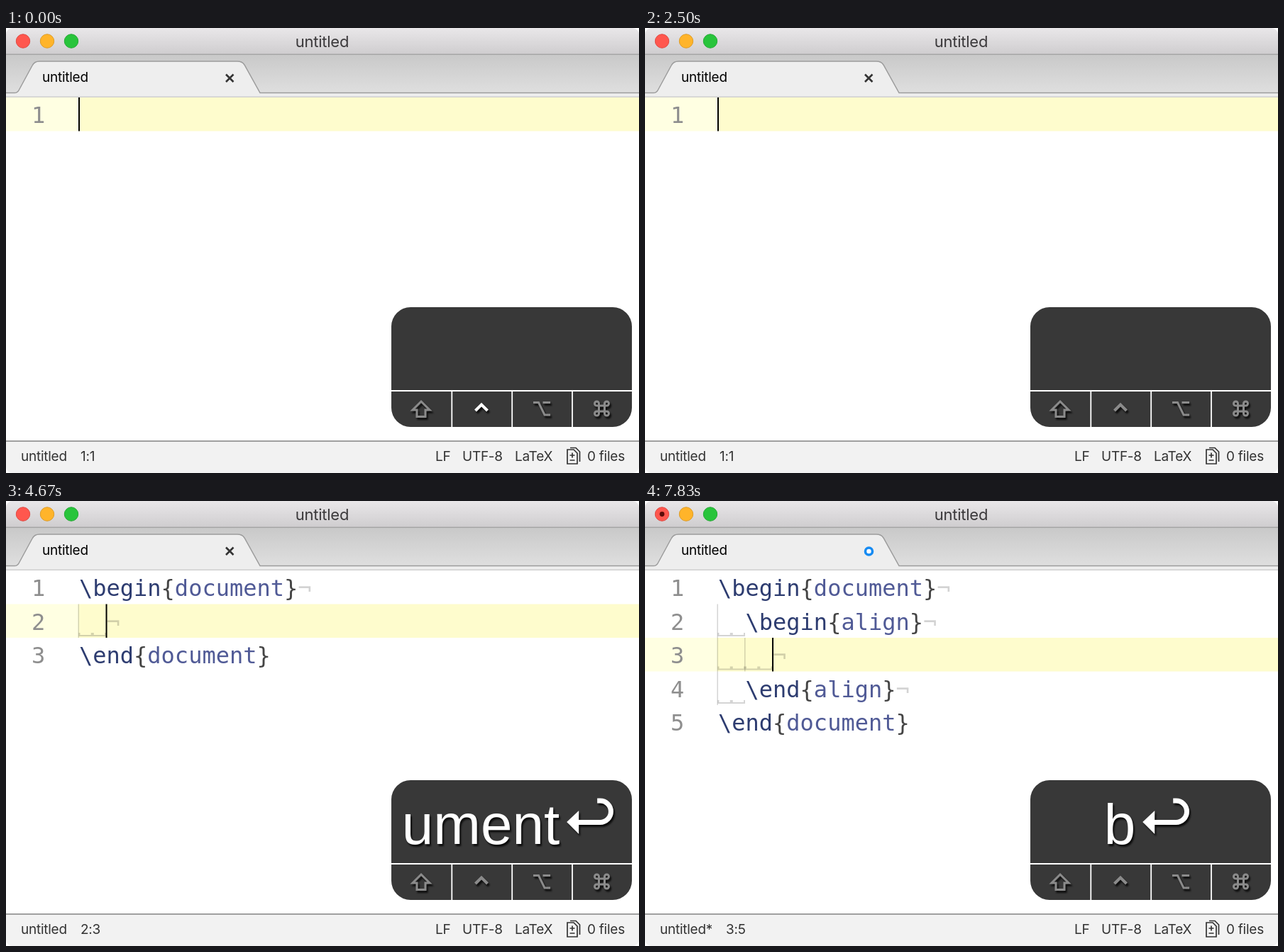
Animation, 892 px wide and 628 px high, one loop 8000 ms. Source, as an HTML page:

```html
<!DOCTYPE html>
<html lang="en">
<head>
<meta charset="utf-8">
<title>untitled</title>
<style>
  html, body { margin: 0; width: 100%; height: 100%; overflow: hidden; background: #fff; }
  svg { display: block; width: 100%; height: 100%; }
  text { font: 19px Inter, Roboto, sans-serif; letter-spacing: -.25px; fill: #333; white-space: pre; }
  .title { font-size: 22px; fill: #3b393b; }
  .mono { font: 32px "DejaVu Sans Mono", monospace; letter-spacing: 0; fill: #444; }
  .query { font-size: 24px; fill: #333; }
  .number { fill: #8e8e8e; }
  .command { fill: #2d3c70; }
  .name { fill: #505a96; }
  .mark { fill: #000; opacity: .17; }
  .space { fill: none; stroke: #000; stroke-width: 2; opacity: .17; }
  .small { font-size: 17px; letter-spacing: -.2px; }
  .keys { font: 80px "Liberation Sans", Arial, sans-serif; letter-spacing: 0; fill: #fff; }
  .lifted { filter: drop-shadow(2px 3px 1px #000c); }
  .panel { filter: drop-shadow(0 2px 6px #0006); }
</style>
</head>
<body>
<svg id="stage" viewBox="0 0 892 628" xmlns="http://www.w3.org/2000/svg"></svg>
<script>
const LOOP = 8000, STEPS = 48, STEP = LOOP / STEPS;
const LEFT = 103, CHAR = 19.27, TOP = 98, ROW = 47.5;
const ENVIRONMENTS = ['align', 'align*', 'aligned', 'alignat', 'alignat*', 'alignedat', ''];

const block = (name, body) => `\\begin{${name}}\n${body}\n\\end{${name}}`;
const nested = block('document', '  \\begin{align}\n    \n  \\end{align}');

// Each entry changes part of the state from its step on.
const timeline = [
  [0, { text: '', row: 0, palette: null, dirty: false, mod: 'control', keys: '' }],
  [2, { palette: '', keys: 'b' }],
  [3, { mod: '' }],
  [6, { keys: 'b↩' }],
  [7, { palette: null, text: block('align', '  '), row: 1 }],
  [8, { text: block('align', '   ') }],
  [9, { dirty: true }],
  [11, { mod: 'command', keys: '' }],
  [12, { text: block('align', '  '), keys: 'z' }],
  [13, { text: '', row: 0, keys: 'zz' }],
  [15, { dirty: false, mod: '', keys: '' }],
  [16, { mod: 'control' }],
  [17, { palette: '', keys: 'b' }],
  [18, { mod: '' }],
  ...[...'document'].map((_, i) => [19 + i, {
    palette: 'document'.slice(0, i + 1),
    keys: 'bdocument'.slice(0, i + 2).slice(-6)
  }]),
  [27, { palette: null, text: block('document', '  '), row: 1, keys: 'ument↩' }],
  [30, { dirty: true }],
  [33, { mod: 'control', keys: '' }],
  [34, { palette: '', keys: 'b' }],
  [35, { mod: '' }],
  [41, { palette: null, text: nested, row: 2, keys: 'b↩' }]
];

function stateAt(step) {
  const state = { since: 0 };
  for (const [start, change] of timeline) {
    if (start > step) break;
    Object.assign(state, change);
    if ('text' in change || 'palette' in change) state.since = start;
  }
  state.caret = (step - state.since) * STEP % 800 < 400;
  return state;
}

const rect = (x, y, w, h, fill, more = '') =>
  `<rect x="${x}" y="${y}" width="${w}" height="${h}" fill="${fill}" ${more}/>`;
const text = (x, y, content, cls = '', more = '') =>
  `<text x="${x}" y="${y}" class="${cls}" ${more}>${content}</text>`;
const path = (d, stroke, width, fill = 'none') =>
  `<path d="${d}" fill="${fill}" stroke="${stroke}" stroke-width="${width}"/>`;
const circle = (x, y, r, fill, stroke = 'none', width = 1) =>
  `<circle cx="${x}" cy="${y}" r="${r}" fill="${fill}" stroke="${stroke}" stroke-width="${width}"/>`;
const gradient = (id, from, to) =>
  `<linearGradient id="${id}" x2="0" y2="1"><stop stop-color="${from}"/><stop offset="1" stop-color="${to}"/></linearGradient>`;

const defs = `<defs>
  ${gradient('titlebar', '#e9e7e9', '#cfcdcf')}
  ${gradient('tabbar', '#c9c9c9', '#dfdfdf')}
  <clipPath id="window"><rect width="892" height="628" rx="9"/></clipPath>
  <clipPath id="below"><rect y="37" width="892" height="591"/></clipPath>
</defs>`;

function chrome({ dirty }) {
  const lights = [['#ff574e', '#df4740'], ['#ffb42a', '#dd9a24'], ['#28c43b', '#22a832']];
  return rect(0, 0, 892, 37, 'url(#titlebar)') + rect(0, 36.5, 892, 1.5, '#a6a6a6')
    + lights.map(([fill, edge], i) => circle(24 + 34 * i, 18.5, 9.7, fill, edge)).join('')
    + (dirty ? circle(24, 18.5, 3.4, '#5c0c08') : '')
    + text(445.5, 27, 'untitled', 'title', 'text-anchor="middle"')
    + rect(0, 38, 892, 54, 'url(#tabbar)') + rect(0, 91, 892, 7, '#eee')
    + path('M-2 91.5H12Q16 91.5 18 88L37 53Q40 47 47 47H326Q333 47 336 52L358 91.5H894', '#9c9c9c', 1.5, '#eee')
    + rect(17, 91, 340, 2, '#eee') + rect(0, 96.5, 892, 1.5, '#cfcfcf')
    + text(51, 76, 'untitled', '', 'style="fill:#000"')
    + (dirty ? circle(315.5, 71, 5, '#fff', '#168bf2', 3.6)
             : path('M310 65.5l10.5 10.5M320.5 65.5l-10.5 10.5', '#333', 2.6));
}

function codeLine(line, i, last) {
  const y = TOP + ROW * i, indent = line.search(/\S|$/);
  let out = text(36, y + 36, i + 1, 'mono number');
  for (let c = 0; c < indent; c++) {
    const x = LEFT - .5 + CHAR * c;
    if (c % 2 == 0) out += rect(x - 1, y, 1.5, ROW, '#000', 'opacity=".17"');
    out += `<path class="space" d="M${x + 1} ${y + 88 - ROW}v4h${CHAR - 2}v-4"/>`;
  }
  const colored = line.trim().replace(/(\\\w+){(\w+)}/,
    '<tspan class="command">$1</tspan>{<tspan class="name">$2</tspan>}');
  out += text(LEFT + CHAR * indent, y + 36, colored, 'mono');
  return last ? out : out + text(LEFT + CHAR * line.length, y + 36, '¬', 'mono mark');
}

function editor({ text: source, row, palette, caret }) {
  const lines = source.split('\n'), y = TOP + ROW * row;
  const focused = palette === null;
  return (focused ? rect(0, y, 102, ROW, '#ffffe2') + rect(102, y, 790, ROW, '#fefccd') : '')
    + lines.map((line, i) => codeLine(line, i, i == lines.length - 1)).join('')
    + (focused && caret ? rect(LEFT - 1 + CHAR * lines[row].length, y, 2, ROW, '#000') : '');
}

function statusBar({ text: source, row, dirty }) {
  const column = source.split('\n')[row].length + 1;
  return rect(0, 582, 892, 46, '#f2f2f2') + rect(0, 582, 892, 2, '#a0a0a0')
    + text(21, 611, 'untitled' + (dirty ? '*' : ''))
    + text(dirty ? 114 : 105, 611, `${row + 1}:${column}`)
    + text(605, 611, 'LF') + text(643, 611, 'UTF-8') + text(717, 611, 'LaTeX')
    + path('M791 595H800L805 600V615H791ZM795 592.5H803L808.5 598V612M798 599.5v7M794.5 603h7M794.5 610h7', '#333', 1.7)
    + text(819, 611, '0 files');
}

function paletteList() {
  return rect(836, 120, 17, 508, '#f8f8f8') + rect(837, 120, 16, 420, '#b9b9b9', 'rx="7"')
    + ENVIRONMENTS.map((name, i) => rect(43.5, 120 + 79.8 * i, 791.5, 79.8, i ? '#fff' : '#e0e0e0',
        'stroke="#9c9c9c" stroke-width="1.7"')
      + text(60, 166 + 79.8 * i, `${name} <tspan class="small">${name}</tspan>`)).join('');
}

function palettePanel({ palette, caret }) {
  if (palette === null) return '';
  const empty = palette.length > 1;
  return '<g clip-path="url(#below)">'
    + rect(24.8, 37, 846.4, empty ? 142.5 : 610, '#e8e8e8', 'rx="3" stroke="#8f8f8f" stroke-width="1.7" class="panel"')
    + rect(24, 37, 848, 2, '#8f8f8f')
    + rect(43, 57, 809.5, 44, '#fff', 'rx="2" stroke="#9c9c9c" stroke-width="1.7"')
    + text(52, 87, palette, 'mono query')
    + (caret ? rect(52.3 + 14.45 * palette.length, 58, 2, 42, '#000') : '')
    + (empty ? text(41, 139, 'No matches found') : paletteList()) + '</g>';
}

const ruler = document.createElement('canvas').getContext('2d');
ruler.font = '80px "Liberation Sans", Arial, sans-serif';

const modifiers = {
  shift: 'M585 527L597 539H591V548.5H579V539H573Z',
  control: 'M661.5 540L670 531.5L678.5 540',
  option: 'M743 528.5H750.5L759 546H767M756.5 528.5H767',
  command: 'M835.5 530a3 3 0 1 0 -3 3H846.5a3 3 0 1 0 -3 -3V544a3 3 0 1 0 3 -3H832.5a3 3 0 1 0 3 3Z'
};

function keyOverlay({ keys, mod }) {
  const enter = keys.endsWith('↩'), typed = keys.replace('↩', '');
  const middle = 712.5 - (enter ? 43.5 : 0);
  const arrowX = middle + ruler.measureText(typed).width / 2 + 10;
  const arrow = enter ? `<g transform="translate(${arrowX} 0)">`
    + path('M0 453L17 437V470Z', 'none', 0, '#fff')
    + path('M15 453.5H47a15.2 15.2 0 0 0 0-30.5h-4', '#fff', 7) + '</g>' : '';
  const icons = Object.entries(modifiers).map(([name, d]) =>
    path(d, name == mod ? '#fff' : '#8b8b8b', name == 'control' ? 4 : 3)).join('');
  return rect(543, 394, 339, 169, '#000', 'rx="27" opacity=".78"')
    + path('M543 512H882M628.3 512V563M713.2 512V563M798 512V563', '#fff', 1.8)
    + `<g class="lifted">${text(middle, 484, typed, 'keys', 'text-anchor="middle"')}${arrow}${icons}</g>`;
}

const stage = document.getElementById('stage');
let shown = -1;

function draw(now) {
  // The small lead keeps steps aligned with times rounded to 10 ms.
  const step = Math.min(STEPS - 1, Math.floor((now % LOOP + 5) / STEP));
  if (step != shown) {
    const state = stateAt(step);
    stage.innerHTML = defs + '<g clip-path="url(#window)">' + rect(0, 0, 892, 628, '#fff')
      + [chrome, editor, statusBar, palettePanel, keyOverlay].map(part => part(state)).join('') + '</g>';
    shown = step;
  }
}

const start = performance.now();
function tick() {
  draw(performance.now() - start);
  requestAnimationFrame(tick);
}
tick();
</script>
</body>
</html>
```
